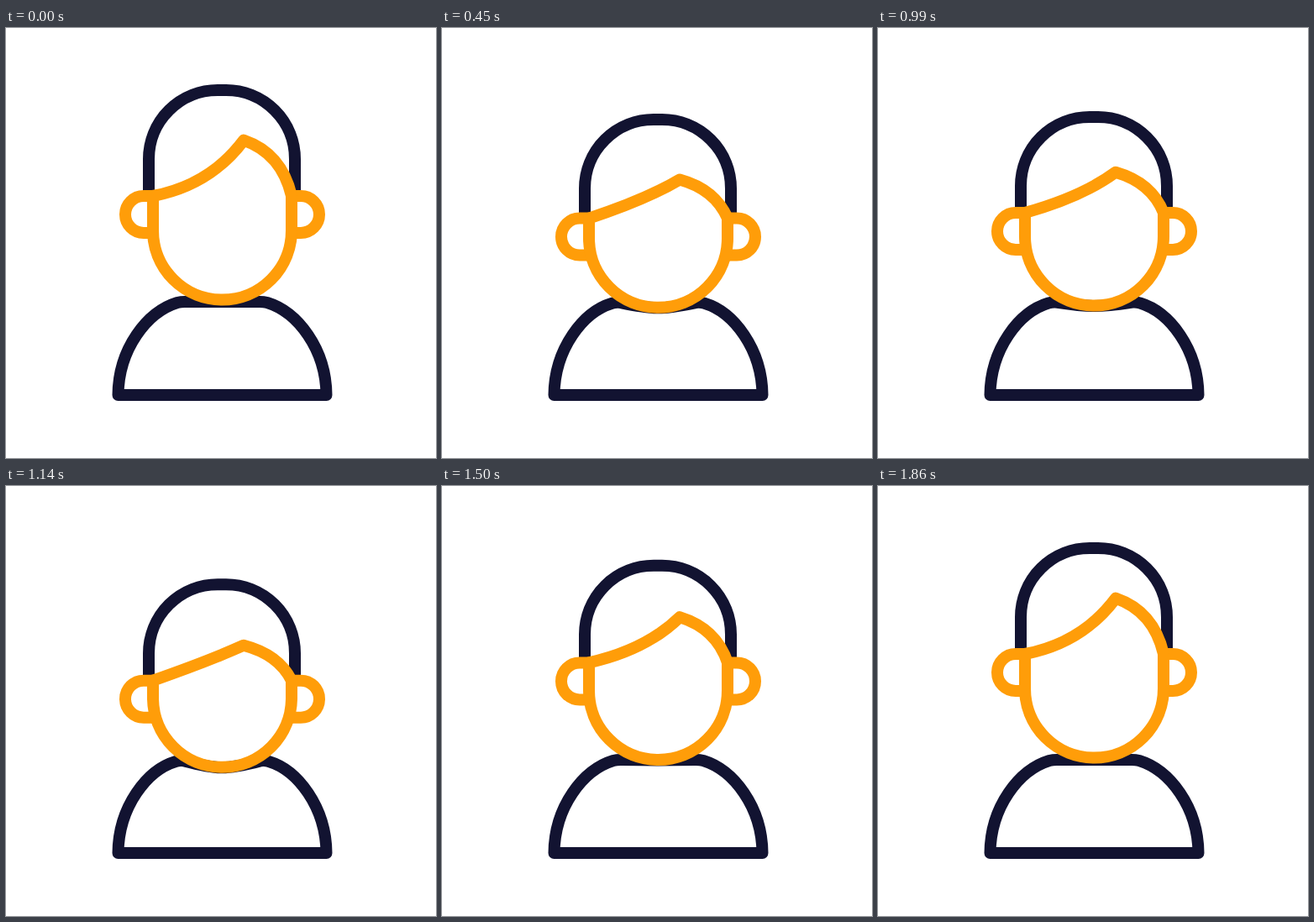
Write an HTML page that moves like this. It is 512 by 512 pixels and loops after 4.07 s.

```html
<!DOCTYPE html>
<html lang="en">
<head>
<meta charset="utf-8">
<title>Nodding person</title>
<style>
  html, body { margin: 0; width: 100%; height: 100%; overflow: hidden; background: #fff; }
  svg { display: block; width: 100%; height: 100%; }
  path { fill: none; stroke-width: 14; stroke-linejoin: round; }
  .navy { stroke: #121331; }
  .orange { stroke: #ff9d09; }
</style>
</head>
<body>
<svg viewBox="0 0 512 512">
  <path id="body" class="navy"/>
  <path id="hair" class="navy"/>
  <path id="ears" class="orange"/>
  <path id="face" class="orange"/>
</svg>
<script>
const LOOP = 4070, STEP = 30;

// time in ms, then the downward shift of crown, ears, fringe tip and chin
const POSES = [
  [0, 0, 0, 0, 0],
  [90, -3, -5, -6, -2],
  [650, 50, 39, 67.5, 13.7],
  [990, 32, 20, 38, 7],
  [1300, 55.5, 44.5, 76, 16],
  [1670, -6, -16, -19, -8],
  [1860, 0, 0, 0, 0]
];

const parts = Object.fromEntries(
  ['body', 'hair', 'ears', 'face'].map(id => [id, document.getElementById(id)]));
const ease = p => (1 - Math.cos(Math.PI * p)) / 2;

function poseAt(time) {
  const next = POSES.findIndex(pose => pose[0] > time);
  if (next < 0) return [0, 0, 0, 0];
  const from = POSES[next - 1], to = POSES[next];
  const k = ease((time - from[0]) / (to[0] - from[0]));
  return from.slice(1).map((v, i) => v + (to[i + 1] - v) * k);
}

function draw(time) {
  const [crown, ear, tip, chin] = poseAt(time);
  const earY = 200 + ear, tipY = 133.7 + tip, jawY = 241 + chin;
  const dip = Math.max(0, chin - 2);
  const mirror = x => 515 - x;

  const cornerX = 204 - .2 * dip, cornerY = 327 + .1 * dip;
  const bendX = 209 - .2 * dip, bendY = 325.7 + .1 * dip;
  const neckX = 215 - .3 * dip, neckY = 326 + .15 * dip;
  const slopeY = 326 + .7 * dip, lowY = 326 + dip;

  parts.body.setAttribute('d', `M133.5 437
    C134 382 168 338 ${cornerX} ${cornerY}
    Q${bendX} ${bendY} ${neckX} ${neckY}
    C232 ${slopeY} 245 ${lowY} 257.5 ${lowY}
    C270 ${lowY} 283 ${slopeY} ${mirror(neckX)} ${neckY}
    Q${mirror(bendX)} ${bendY} ${mirror(cornerX)} ${cornerY}
    C347 338 381 382 381.5 437Z`);

  parts.hair.setAttribute('d', `M170 ${earY}V${156 + crown}
    a82 82 0 0 1 82 -82h10a82 82 0 0 1 82 82V${earY}`);

  parts.ears.setAttribute('d', `M179 ${earY}H164a22 22 0 0 0 0 44h15
    M336 ${earY}h15a22 22 0 0 1 0 44h-15`);

  parts.face.setAttribute('d', `M175 ${earY}
    Q243 ${187 + .37 * tip} 283 ${tipY}
    Q${328 - .06 * tip} ${149 + .92 * tip} 340 ${earY}
    V${jawY}A82.5 82.5 0 0 1 175 ${jawY}Z`);
}

function tick() {
  const time = performance.now() % LOOP;
  draw(Math.floor(time / STEP) * STEP);
  requestAnimationFrame(tick);
}
tick();
</script>
</body>
</html>
```
